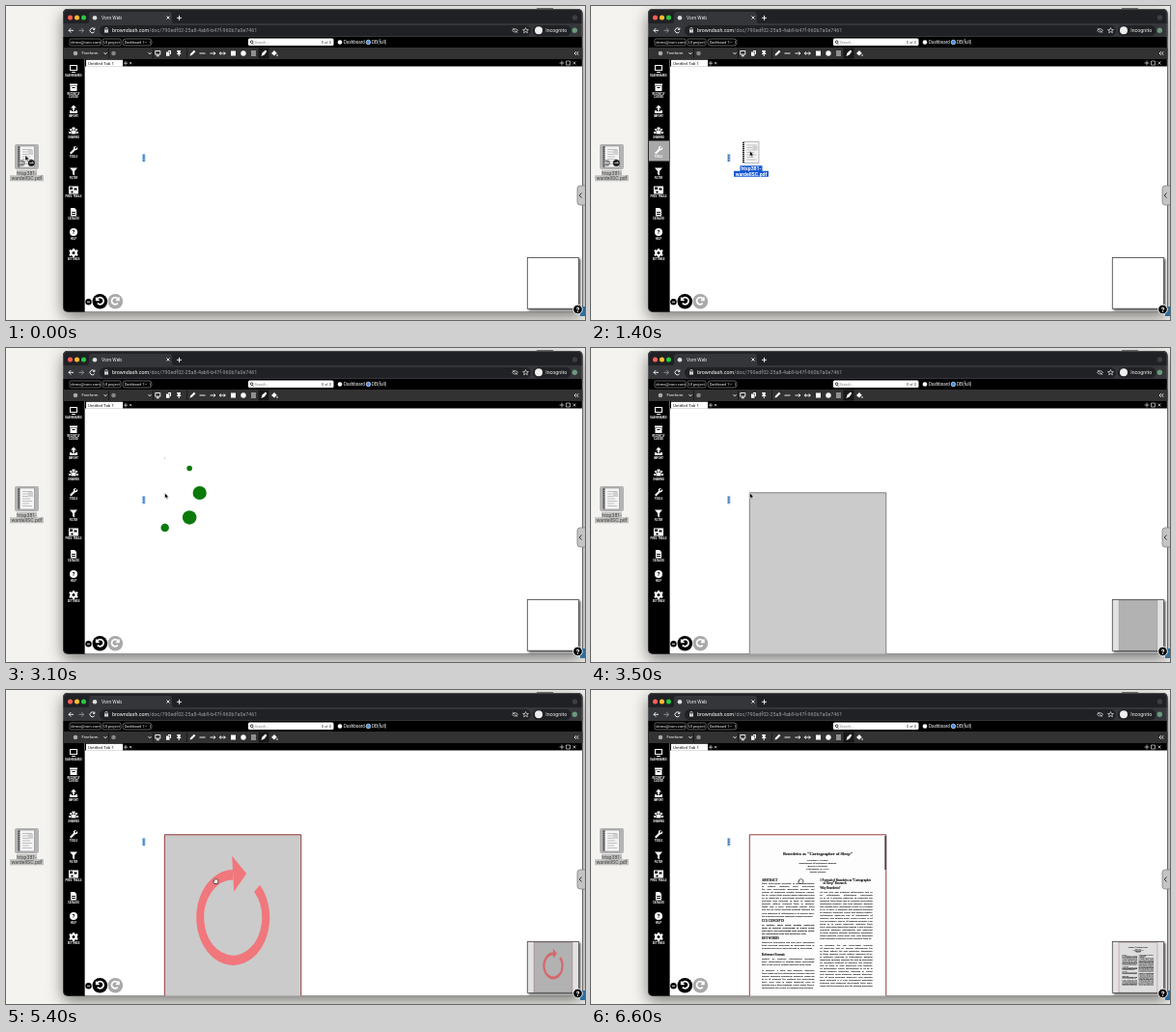
Animation of 600 by 325 pixels, one loop 6800 ms. Source, as an HTML page:

```html
<!DOCTYPE html>
<html lang="en">
<head>
<meta charset="utf-8">
<title>Dropping a PDF into a workspace</title>
<style>
  html, body { margin: 0; width: 100%; height: 100%; overflow: hidden; background: #f4f3ef; }
  svg { display: block; width: 600px; height: 325px; }
  text { font-family: Roboto, Inter, sans-serif; white-space: pre; }
  #print { stroke: #222; stroke-width: .1; }
  #print text { font-family: "Liberation Serif", "Noto Serif", serif; }
  .line { fill: none; stroke: #fff; stroke-width: .9; }
  .thin { stroke-width: .6; }
  .thick { stroke-width: 1.7; }
  .dim { stroke: #999; }
  .dark { fill: none; stroke: #222; stroke-width: .9; }
</style>
</head>
<body>
<svg viewBox="0 0 600 325">
  <defs>
    <filter id="shadow" x="-10%" y="-10%" width="120%" height="125%">
      <feDropShadow dx="0" dy="5" stdDeviation="8" flood-opacity=".5"/>
    </filter>
    <filter id="lift" x="-20%" y="-20%" width="150%" height="150%">
      <feDropShadow dx="1.5" dy="1.5" stdDeviation="1.2" flood-opacity=".7"/>
    </filter>
    <clipPath id="view"><rect x="82" y="62" width="515" height="254.500"/></clipPath>
    <clipPath id="mapView"><rect x="541" y="261" width="52" height="52"/></clipPath>
    <g id="sheet">
      <path d="M13 145h16.500v22h-16.500z" fill="#f4f4f4" stroke="#777" stroke-width=".5"/>
      <path d="M13.500 145.500v21" stroke="#222" stroke-width="2" stroke-dasharray="1.300 .7"/>
      <path d="M17 148.500h10M17 151h6M17 153.500h10M17 156h8M17 158.500h10M17 161h7M17 163.500h10" stroke="#aaa" stroke-width=".7"/>
      <path d="M23 149h5v5h-5z" fill="#d0d0d0"/>
    </g>
    <g id="name" font-size="5.200" text-anchor="middle">
      <text x="21.500" y="174.600">htsp381-</text>
      <text x="21.500" y="180">wardellSC.pdf</text>
    </g>
  </defs>

  <rect width="600" height="325" fill="#f4f3ef"/>
  <path d="M550 2.500h17" stroke="#777"/>

  <!-- file on the desktop -->
  <rect x="9" y="143" width="25" height="26" rx="2" fill="#b4b4b4"/>
  <use href="#sheet"/>
  <path d="M11 169.700h21v5.500h7v6h-35v-6h7z" fill="#c0c0be"/>
  <use href="#name" fill="#444"/>
  <g id="badges">
    <circle cx="16.500" cy="162.500" r="3.300" fill="#888"/>
    <circle cx="26.300" cy="162.500" r="3.500" fill="#222"/>
    <path class="line thin" d="M18.500 162.500h-4l1.500-1.500M24.300 162.500h4l-1.500-1.500"/>
  </g>

  <!-- browser -->
  <rect x="59" y="3" width="538.500" height="314" rx="5" filter="url(#shadow)"/>
  <path d="M59 18v-10q0-5 5-5h528.500q5 0 5 5v10z" fill="#202124"/>
  <circle cx="66.500" cy="12" r="2.500" fill="#ff5f57"/>
  <circle cx="73.500" cy="12" r="2.500" fill="#febc2e"/>
  <circle cx="80.500" cy="12" r="2.500" fill="#28c840"/>
  <path d="M84 18q2 0 2-2v-7q0-3 3-3h80q3 0 3 3v7q0 2 2 2h423.500v14h-538.500v-14z" fill="#35363a"/>
  <circle cx="92" cy="12.300" r="2.300" fill="#ddd"/>
  <rect x="97" y="20" width="447" height="11" rx="5.500" fill="#202124"/>
  <rect x="546" y="20" width="39.500" height="11" rx="5.500" fill="#202124"/>
  <circle cx="589.500" cy="12" r="2.700" fill="#3c3e42"/>
  <path class="line" d="M166.500 10.500l3 3m0-3l-3 3M179.500 9.800v5m-2.500-2.500h5M70 25.300h-5l2.300-2.300m-2.300 2.300l2.300 2.300M91.700 24.100a2.500 2.500 0 1 0 0 2.500m.2-4v1.800h-1.800"/>
  <path class="line dim" d="M75.500 25.300h5l-2.300-2.300m2.300 2.300l-2.300 2.300"/>
  <path class="line thin" d="M102.800 24.600v-1a1.200 1.200 0 0 1 2.400 0v1M524.500 25.300q3-3.500 6 0q-3 3.500-6 0M525 22.800l5 5M538.500 22.500l.9 2h2l-1.600 1.300.6 2-1.900-1.200-1.900 1.200.6-2-1.600-1.300h2z"/>
  <path d="M102 24.400h4v3.200h-4z" fill="#ccc"/>
  <circle cx="552" cy="25.300" r="4" fill="#eee"/>
  <circle cx="589.300" cy="25.300" r="2.700" fill="#6a9a7c"/>
  <rect x="59.500" y="3.500" width="537.500" height="313" rx="4.500" fill="none" stroke="#fff" stroke-opacity=".22" stroke-width=".8"/>

  <!-- header bar -->
  <g class="line thin dim">
    <rect x="66" y="34" width="32" height="7" rx="1.500"/>
    <rect x="100" y="34" width="19" height="7" rx="1.500"/>
    <rect x="121" y="34" width="30" height="7" rx="3"/>
    <path d="M143.500 36.800l1.300 1.400 1.300-1.400M149.500 36v3"/>
  </g>
  <rect x="251" y="33.500" width="88.500" height="7.600" rx="1.500" fill="#fff"/>
  <path class="dark" d="M255.300 38.700l1.200 1.200M256 37.200a1.300 1.300 0 1 1-2.600 0a1.300 1.300 0 1 1 2.600 0"/>
  <circle cx="346" cy="37.500" r="2.300" fill="#fff"/>
  <circle cx="375.500" cy="37.500" r="2.300" fill="#4a90e2" stroke="#fff" stroke-width=".6"/>

  <!-- toolbar -->
  <path d="M60 43h537.500v12h-537.500z" fill="#323232"/>
  <path d="M261.500 43.500h11v11h-11z" fill="#181818"/>
  <circle cx="72" cy="49" r="2.300" fill="#aaa"/>
  <circle cx="111.500" cy="49" r="2.300" fill="#888"/>
  <path d="M106.500 44v10M152.500 44v10M187.500 44v10" stroke="#111" stroke-width=".7"/>
  <path class="line" d="M101.500 48.200l1.500 1.600 1.500-1.600M147.500 48.200l1.500 1.600 1.500-1.600M154.800 46.500h5v3.700h-5zM157.300 50.500v1.300m-1.500 0h3M200.500 49h6M211.500 49h5.500l-1.700-1.500m1.700 1.500l-1.700 1.500M223 47.500l-1.700 1.500 1.700 1.500m-1.700-1.500h6l-1.700-1.500m1.700 1.500l-1.700 1.500M254 47h5m-5 2h5m-5 2h5M590.700 47.300l-1.600 1.700 1.600 1.700m2.400-3.400l-1.600 1.700 1.600 1.700"/>
  <path d="M166 47.500h3.500v4.300h-3.500zM168 46h3v4h-1v-3h-2zM177 46h4l-.6 2.500 1.300 1.500h-2v2h-1v-2h-2l1.300-1.500zM190.500 51.500l.6-2 3.800-3.700 1.500 1.500-3.800 3.700zM233 46.500h5v5h-5zM264.500 52l1-3.500 3.500-3 1.300 1.500-2.500 3.500zM275 49l3-3 2.700 2.700-2.700 2.700zM281 49.500q1.300 2 0 2.500q-1.200-.5 0-2.500" fill="#fff"/>
  <circle cx="246" cy="49" r="2.700" fill="#fff"/>

  <!-- workspace -->
  <path d="M82 62.500h515v254h-515z" fill="#fff"/>
  <path d="M83 55.700h38v7h-38z" fill="#fff"/>
  <path d="M81.500 55v261.500" stroke="#777" stroke-width=".8"/>
  <path class="line thin" d="M124 57v4.400m-2.200-2.200h4.400M128 58l2.300 2.300m0-2.300l-2.300 2.300M576 56.500v5m-2.500-2.500h5M580.500 57h4v4h-4zM587.500 57.500l3 3m0-3l-3 3"/>
  <path id="hot" d="M60 139.500h21v21h-21z" fill="#a8a8a8"/>
  <g id="sidebar"></g>
  <rect x="141.200" y="153" width="3.200" height="8.500" rx=".7" fill="#8dbcec"/>
  <path d="M142.800 154.500v6" stroke="#1d4f8c" stroke-width="1.300" stroke-dasharray="1.300 .9"/>

  <g id="labels"></g>

  <g clip-path="url(#view)">
    <g id="page">
      <path id="paper" d="M164.300 149.800h141.500v184h-141.500z" stroke-width=".9"/>
      <g id="print"></g>
      <g transform="translate(235.200 235.500) scale(1 1.300)">
        <g id="spin">
          <path d="M24.900-23.200A34 34 0 1 1 0-34" fill="none" stroke="#f0777c" stroke-width="8"/>
          <path d="M-1-49L14-35 1-20.500z" fill="#f0777c"/>
        </g>
      </g>
    </g>
    <path id="thumb" d="M305.200 151v35" stroke="#444" stroke-width="1.700"/>
    <g id="dots" fill="#0b7a0b"></g>
  </g>

  <circle cx="85.500" cy="306.300" r="3.200"/>
  <path class="line" d="M84 306.300h3"/>
  <circle cx="97.300" cy="305.800" r="7.800"/>
  <circle cx="113.300" cy="305.800" r="7.800" fill="#a9a9a9"/>
  <path class="line thick" d="M93.700 301.500v3h3M94 304.300a3.600 3.600 0 1 1 .8 3.300M116.900 301.500v3h-3M116.600 304.300a3.600 3.600 0 1 0-.8 3.300"/>

  <!-- overview map -->
  <rect x="540.300" y="260.500" width="53" height="52.700" fill="#fff" stroke="#444" stroke-width=".8" filter="url(#lift)"/>
  <g id="map" clip-path="url(#mapView)">
    <path d="M540 260h54v54h-54z" fill="#e2e2e2"/>
    <use href="#page" transform="translate(500.700 219) scale(.282)"/>
    <path d="M547 260h40v54h-40z" fill-opacity=".12"/>
  </g>
  <path d="M595 311h5v10h-5z" fill="#2f6d9c"/>
  <rect x="592" y="186" width="12" height="20" rx="3" fill="#c4c4c4" stroke="#777" stroke-width=".7"/>
  <path class="dark" d="M596.500 193.500l-2.300 2.500 2.300 2.500"/>
  <circle cx="592.500" cy="314" r="4.800" stroke="#fff" stroke-width=".9"/>
  <text x="592.500" y="316.600" font-size="7.500" font-weight="bold" fill="#fff" text-anchor="middle">?</text>

  <g id="ghost">
    <use href="#sheet"/>
    <path d="M10 169.700h23v5.500h6.500v6h-36v-6h6.500z" fill="#1659d4"/>
    <use href="#name" fill="#fff" font-weight="bold"/>
  </g>
  <path id="arrow" d="M0 0v5.800l1.400-1.200.9 2 1-.5-.9-1.900h1.800z" stroke="#fff" stroke-width=".5"/>
  <path id="hand" d="M-1.700 2.500l-1.100-2.100q0-1 1-.4v-1.700q.6-1 1.100-.2q.7-.8 1.200 0q.7-.6 1.100.2q.8-.2.800.7v1.800l-.7 1.700z" fill="#eee" stroke="#222" stroke-width=".7"/>
</svg>

<script>
const $ = id => document.getElementById(id);
const NS = 'http://www.w3.org/2000/svg';

function add(parent, tag, attrs, text) {
  const el = document.createElementNS(NS, tag);
  for (const key in attrs) el.setAttribute(key, attrs[key]);
  if (text) el.textContent = text;
  parent.append(el);
  return el;
}

function label(parent, x, y, size, fill, text, more) {
  return add(parent, 'text', { x, y, 'font-size': size, fill, ...more }, text);
}

[
  [99, 14.2, 4.9, '#eee', 'Vorn Web'],
  [559.300, 27.200, 5.250, '#eee', 'Incognito'],
  [67.300, 39, 4, '#fff', 'demo@vorn.com'],
  [101.300, 39, 3.9, '#fff', 'UI project'],
  [123, 38.800, 3.600, '#fff', 'Dashboard 1'],
  [257.500, 39, 3.900, '#888', 'Search...'],
  [327, 39, 3.900, '#444', '0 of 0'],
  [350, 39.100, 4.500, '#fff', 'Dashboard'],
  [379, 39.100, 4.600, '#fff', 'DB(full)'],
  [78.500, 50.400, 4.200, '#fff', 'Freeform'],
  [85, 61.300, 4.400, '#111', 'Untitled Tab 1']
].forEach(args => label($('labels'), ...args));
const url = label($('labels'), 110, 27.200, 5.330, '#fff', 'browndash.com');
add(url, 'tspan', { fill: '#9aa0a6' }, '/doc/790edf02-25a8-4ab9-b47f-960b7a0e7461');

// Sidebar: icon centre, icon path around it, caption
[
  [65, 'M-4-4h8v6h-8zm1 1v4h6v-4zM-2 3h4v1h-4z', 'DASHBOARDS'],
  [84.500, 'M-4-4h8v2h-8zM-3.500-1.500h7v5h-7zm2 1v1h3v-1z', 'RECENTLY|CLOSED'],
  [107, 'M0-4.500l3 3h-2v3h-2v-3h-2zM-4 1h2v1h4v-1h2v3h-8z', 'IMPORT'],
  [129, 'M-1.500-3.500h3v3h-3zM-4-2h2v2h-2zM2-2h2v2h-2zM-2.500 0h5v3.500h-5zM-5 1h2v2h-2zM3 1h2v2h-2z', 'SHARING'],
  [149, 'M-4 3l4-4q-1-3 3-3l-2 2 1 1 2-2q1 3-2.500 3.500l-4 4z', 'TOOLS'],
  [171.500, 'M-4-4h8l-3 3.500v4.500l-2-1.500v-3z', 'FILTER'],
  [190.500, 'M-5-4h10v8h-10zm1 1v2.500h3v-2.500zm4.500 1v2h3v-2zm-3 3v2h2v-2z', 'PRES. TRAILS'],
  [213.500, 'M-3-4.500h4l2 2v6.500h-6zm1 4v1h4v-1zm0 2v1h4v-1z', 'CATALOG'],
  [234, 'M-4 0a4 4 0 1 1 8 0a4 4 0 1 1-8 0', 'HELP'],
  [255.500, 'M-1-4.500h2v1.200l1.500.6 1-.8 1.200 1.600-.9.800v2.200l.9.800-1.200 1.600-1-.8-1.500.6v1.200h-2v-1.200l-1.500-.6-1 .8-1.200-1.600.9-.8v-2.200l-.9-.8 1.200-1.600 1 .8 1.500-.6zm1 3a1.500 1.500 0 1 0 0 3a1.500 1.500 0 1 0 0-3', 'SETTINGS']
].forEach(([y, d, caption]) => {
  const bar = $('sidebar');
  const mid = { 'text-anchor': 'middle', 'font-weight': 'bold' };
  add(bar, 'path', { d, fill: '#fff', 'fill-rule': 'evenodd', transform: `translate(70 ${y})` });
  if (caption === 'HELP') label(bar, 70, y + 2.200, 6, '#000', '?', mid);
  caption.split('|').forEach((part, i) => label(bar, 70, y + 7.600 + i * 2.900, 2.700, '#fff', part, mid));
});

// Printed page: filler prose set in two justified columns
const print = $('print');
const pen = document.createElement('canvas').getContext('2d');
const words = ('the of memory a mind and as inquiry in which attention to knowledge is observed through ' +
  'patterns structure with early thinkers described by natural images that form annotation this paper ' +
  'explores information from texts for discovery and').split(' ');
let seed = 7;
const word = () => words[(seed = seed * 16807 % 2147483647) % words.length];

function width(text, size, bold) {
  pen.font = `${bold ? 'bold ' : ''}100px "Liberation Serif", "Noto Serif", serif`;
  return pen.measureText(text).width * size / 100;
}

function prose(x, y, count, bold) {
  const size = 2.850, full = 54.500;
  for (let i = 0; i < count; i++) {
    let row = word(), next;
    while (width(row + ' ' + (next = word()), size, bold) < full) row += ' ' + next;
    const slack = i < count - 1 ? (full - width(row, size, bold)) / (row.split(' ').length - 1) : 0;
    label(print, x, y + i * 3.050, size, '#111', row,
      { 'word-spacing': slack, 'font-weight': bold ? 'bold' : 'normal' });
  }
}

const center = { 'text-anchor': 'middle' };
const strong = { 'font-weight': 'bold' };
label(print, 235, 171.200, 4.450, '#111', 'Benedetto as “Cartographer of Sleep”', { ...center, ...strong });
['Marietta L Wardell', 'Department of Computer Science', 'Brown University', 'Providence, RI USA', 'author contact']
  .forEach((row, i) => label(print, 235, 177 + i * 2.900, 2.900, '#111', row, center));

[
  [177, 197.500, 'ABSTRACT'], [177, 240, 'CCS CONCEPTS'], [177, 257.700, 'KEYWORDS'],
  [177, 275, 'Reference Format:'],
  [237.300, 197.500, '1 Portrait of Benedetto as “Cartographer'], [240.500, 201, 'of Sleep” Research'],
  [237.300, 206, 'Why Benedetto?']
].forEach(([x, y, text]) => label(print, x, y, 3, '#111', text, strong));
[
  [177, 201, 12], [177, 243.500, 4, true], [177, 261.500, 3], [177, 278.500, 3], [177, 291, 7],
  [237.300, 209.500, 17], [237.300, 264.500, 15]
].forEach(args => prose(...args));

// Cubic easing with control points (.2,.2) and (.4,.8)
function spline(x) {
  const bez = (a, b, u) => 3 * a * u * (1 - u) ** 2 + 3 * b * u * u * (1 - u) + u ** 3;
  let lo = 0, hi = 1;
  for (let i = 0; i < 20; i++) {
    const mid = (lo + hi) / 2;
    bez(.2, .4, mid) < x ? lo = mid : hi = mid;
  }
  return bez(.2, .8, lo);
}

function bubble(age) {
  if (age < 0) return 0;
  const third = age % 1000 / 1000 * 3;
  return 8.300 * (third < 1 ? spline(third) : third < 2 ? 1 - spline(third - 1) : 0);
}

const dots = Array.from({ length: 8 }, (_, i) => {
  const a = i * Math.PI / 4;
  return add($('dots'), 'circle', { cx: 164.700 + 36 * Math.sin(a), cy: 150 - 36 * Math.cos(a) });
});

const show = (id, on) => $(id).style.display = on ? '' : 'none';
const move = (id, x, y) => $(id).setAttribute('transform', `translate(${x} ${y})`);

const LOOP = 6800, STEP = 100;
const DROP = 1500, PLACED = 3400, GRAB = 4300, SELECT = 4600, SPIN = 4900, PRINTED = 5800, SCROLLBAR = 6500;

function draw(t) {
  const u = Math.min(1, Math.max(0, (t - 300) / 1000));
  const drag = u * u * (3 - 2 * u);
  const dx = 144.500 * drag, dy = -4.500 * drag;

  show('badges', t < DROP);
  show('ghost', t >= 400 && t < DROP);
  show('hot', 20 + dx > 60 && t < DROP);
  move('ghost', dx, dy);
  show('arrow', t < GRAB);
  move('arrow', 20 + dx, 154.500 + dy);
  show('hand', t >= GRAB);
  move('hand', t < SELECT ? 216 : 217.500, 198);

  show('dots', t >= DROP && t < PLACED);
  dots.forEach((dot, i) => dot.setAttribute('r', bubble(t - 1480 - i * 125)));

  const printed = t >= PRINTED;
  show('page', t >= PLACED);
  show('map', t >= PLACED);
  show('print', printed);
  show('spin', t >= SPIN && !printed);
  show('thumb', t >= SCROLLBAR);
  $('paper').setAttribute('fill', printed ? '#fdfdfd' : '#cbcbcb');
  $('paper').setAttribute('stroke', t < SELECT ? '#777' : '#8c2428');
  $('spin').setAttribute('transform', `rotate(${(t - 5400) * .36})`);
}

const start = performance.now();
function tick() {
  const t = (performance.now() - start) % LOOP;
  draw(Math.floor(t / STEP) * STEP);
  requestAnimationFrame(tick);
}
tick();
</script>
</body>
</html>
```
